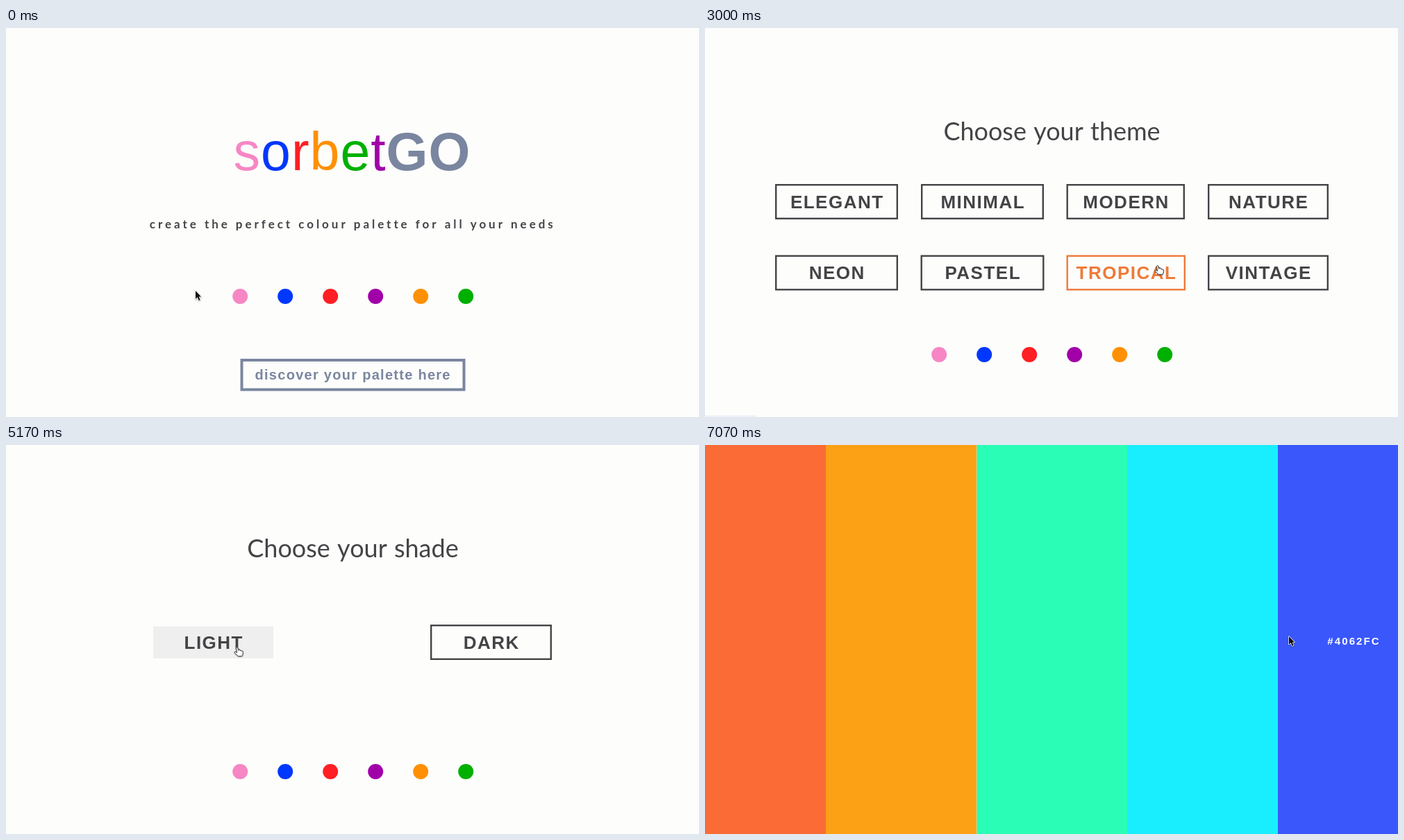
Recreate the animation shown at these times as an HTML page with a canvas. Size 998 px wide and 561 px high, loop 7.1 s.

```html
<!DOCTYPE html>
<html lang="en">
<head>
<meta charset="utf-8">
<title>Palette picker</title>
<style>
  html, body { margin: 0; width: 100%; height: 100%; overflow: hidden; background: #fdfdfc; }
  canvas { display: block; }
</style>
</head>
<body>
<canvas id="stage" width="998" height="561"></canvas>
<script>
const ctx = document.getElementById('stage').getContext('2d');
const LOOP = 7100;
const PAPER = '#fdfdfc', INK = '#444447', SLATE = '#7a869f';
const PINK = '#f687c4', BLUE = '#0037fd', RED = '#ff1f24',
      PURPLE = '#a100a8', ORANGE = '#ff9003', GREEN = '#00b000';
const SANS = '"Liberation Sans", Arial, sans-serif';
const HUMANIST = 'Lato, "Open Sans", sans-serif';

// Box edges are outer edges: x, y, width, height.
const start = { label: 'discover your palette here', box: [337.5, 477, 324, 46.5] };
const themes = [
  ['ELEGANT', 101, 225, 177, '#b8964f'],
  ['MINIMAL', 311, 225, 177, '#9a9a9a'],
  ['MODERN', 520.5, 225, 170.5, '#3f6fd8'],
  ['NATURE', 724, 225, 174, '#4caf50'],
  ['NEON', 101, 327.5, 177, '#c3ec48'],
  ['PASTEL', 310.5, 327.5, 178, '#f5a3c7'],
  ['TROPICAL', 520.5, 327.5, 171.5, '#ee7a38'],
  ['VINTAGE', 724, 327.5, 174, '#a0714f']
].map(([label, x, y, w, hover]) => ({ label, hover, box: [x, y, w, 51] }));
const shades = [
  { label: 'LIGHT', box: [211, 259, 175, 51], fill: '#efefef', text: INK },
  { label: 'DARK', box: [611, 259, 175, 51], fill: '#000', text: '#fff' }
];
const swatches = [
  ['#FF7340', '#fb6b36'], ['#FFAD16', '#fca116'], ['#28FFBF', '#29fdb6'],
  ['#14F1FF', '#19eefe'], ['#4062FC', '#3a57fb']
];

// Pointer stops: time, x, y.
const stops = [
  [0, 273, 379], [80, 273, 379], [430, 450, 507], [1000, 450, 507],
  [1260, 800, 262], [1330, 800, 256], [1680, 205, 256], [1830, 205, 345],
  [1970, 276, 349], [2350, 400, 350], [2550, 420, 350], [3000, 652, 343],
  [3350, 815, 350], [3500, 815, 350], [3850, 645, 348], [4200, 642, 345],
  [4500, 643, 300], [4650, 640, 292], [5050, 333, 292], [5700, 333, 292],
  [6100, 80, 295], [6480, 80, 295], [7070, 841, 276], [7100, 841, 276]
];

function pointerAt(t) {
  const i = stops.findIndex(s => s[0] > t);
  const [t0, x0, y0] = stops[i - 1], [t1, x1, y1] = stops[i];
  const u = (t - t0) / (t1 - t0), e = u * u * (3 - 2 * u);
  return [x0 + (x1 - x0) * e, y0 + (y1 - y0) * e];
}

const inside = ([px, py], [x, y, w, h]) => px >= x && px <= x + w && py >= y && py <= y + h;

function text(str, x, y, font, color, spacing = 0, wordGap = 0) {
  ctx.font = font;
  ctx.letterSpacing = spacing + 'px';
  ctx.wordSpacing = wordGap + 'px';
  ctx.textAlign = 'center';
  ctx.fillStyle = color;
  ctx.fillText(str, x + spacing / 2, y);
}

function frame([x, y, w, h], line, color) {
  ctx.strokeStyle = color;
  ctx.lineWidth = line;
  ctx.strokeRect(x + line / 2, y + line / 2, w - line, h - line);
}

function fillBox([x, y, w, h], color, insetX = 0, insetY = 0) {
  ctx.fillStyle = color;
  ctx.fillRect(x + insetX, y + insetY, w - 2 * insetX, h - 2 * insetY);
}

function dots(y) {
  [PINK, BLUE, RED, PURPLE, ORANGE, GREEN].forEach((color, i) => {
    ctx.fillStyle = color;
    ctx.beginPath();
    ctx.arc(337.2 + 65 * i, y, 11, 0, 7);
    ctx.fill();
  });
}

function logo() {
  const name = 'sorbetGO';
  const colors = [PINK, BLUE, RED, ORANGE, GREEN, PURPLE, SLATE, SLATE];
  const fontOf = i => `${i > 5 ? 'bold ' : ''}77px ${SANS}`;
  ctx.textAlign = 'left';
  ctx.letterSpacing = ctx.wordSpacing = '0px';
  const widths = [...name].map((c, i) => {
    ctx.font = fontOf(i);
    return ctx.measureText(c).width + 1;
  });
  let x = 498.5 - widths.reduce((a, b) => a + b) / 2;
  [...name].forEach((c, i) => {
    ctx.font = fontOf(i);
    ctx.fillStyle = colors[i];
    ctx.fillText(c, x, 205);
    x += widths[i];
  });
}

const title = str => text(str, 499.5, 162, `36px ${HUMANIST}`, INK, 0, 1);

function buttonLabel(b, color) {
  const [x, y, w] = b.box;
  text(b.label, x + w / 2, y + 34.7, `bold 26px ${SANS}`, color, 1.5);
}

// Each scene returns whether the pointer is over a link.
function home(p) {
  logo();
  text('create the perfect colour palette for all your needs', 497.3, 289,
       `bold 17px ${HUMANIST}`, INK, 3.96);
  dots(387);
  const over = inside(p, start.box);
  if (over) fillBox(start.box, SLATE);
  frame(start.box, 4, SLATE);
  text(start.label, 499, 507, `bold 20px ${SANS}`, over ? '#fff' : SLATE, 1.28);
  return over;
}

function themePage(p) {
  title('Choose your theme');
  dots(471);
  let any = false;
  for (const b of themes) {
    const over = inside(p, b.box), color = over ? b.hover : INK;
    any ||= over;
    frame(b.box, 2.4, color);
    buttonLabel(b, color);
  }
  return any;
}

function shadePage(p) {
  title('Choose your shade');
  dots(471);
  let any = false;
  for (const b of shades) {
    const over = inside(p, b.box);
    any ||= over;
    if (over) fillBox(b.box, b.fill, 1, 2.5);
    else frame(b.box, 2.4, INK);
    buttonLabel(b, over ? b.text : INK);
  }
  return any;
}

function palettePage(p) {
  swatches.forEach(([code, color], i) => {
    const box = [217 * i - 43, 0, 217, 561];
    fillBox(box, color);
    if (inside(p, box)) text(code, box[0] + 108.5, 288, `bold 15px ${SANS}`, '#fff', 2.1);
  });
  fillBox([390.5, 0, 1.5, 561], '#b9d87c');
  return false;
}

const arrow = new Path2D('M0 0V13L3 10.3L5.2 15.5L7.4 14.5L5.2 9.5H9Z');
const hand = new Path2D('M0 1C0-.8 2.3-.8 2.6 1L3.6 5C5-.1 6 4.6 6.4 5.4C7.6 4.4 8.6 5 8.8 6' +
  'C10 5.2 10.8 6 10.8 7.2V10.5L9.3 14H3.2L-2.6 8.6C-3.4 7.2-1.6 6.4-.4 7.4L1.2 8.6Z');

function pointer([x, y], link) {
  const shape = link ? hand : arrow;
  ctx.save();
  ctx.translate(x - (link ? 1.5 : 0), y);
  ctx.scale(0.9, 0.9);
  ctx.lineJoin = 'round';
  ctx.lineWidth = link ? 1.1 : 1.6;
  ctx.strokeStyle = link ? '#444' : '#fff';
  ctx.fillStyle = link ? '#fff' : '#111';
  ctx.shadowColor = '#0005';
  ctx.shadowBlur = 2;
  ctx.shadowOffsetY = 1;
  ctx.stroke(shape);
  ctx.shadowColor = 'transparent';
  ctx.fill(shape);
  if (link) ctx.stroke(shape);
  ctx.restore();
}

function draw(now) {
  const t = now % LOOP, p = pointerAt(t);
  const scene = t < 560 ? home : t < 4150 ? themePage : t < 5190 ? shadePage : palettePage;
  fillBox([0, 0, 998, 561], PAPER);
  const link = scene(p);
  // Top edge of the browser's link hint.
  if (link && scene === themePage) fillBox([0, 558.5, 74, 2.5], '#f0f0f8');
  pointer(p, link);
}

const begin = performance.now();
function tick() {
  draw(performance.now() - begin);
  requestAnimationFrame(tick);
}
tick();
</script>
</body>
</html>
```
